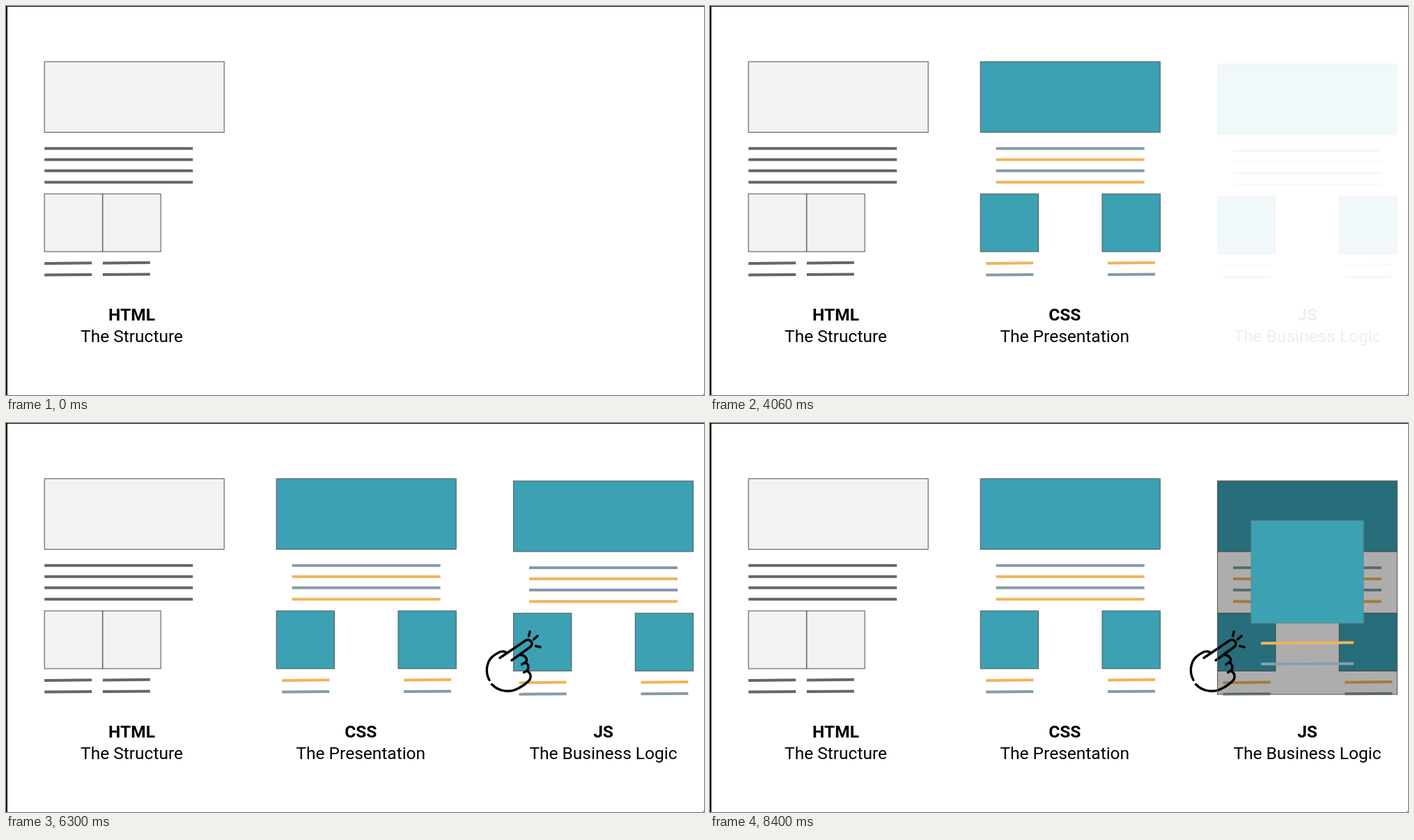
These frames come from a looping animation (1002x559 px, 8540 ms). An HTML page:

```html
<!DOCTYPE html>
<html lang="en">
<head>
<meta charset="utf-8">
<title>HTML, CSS and JS</title>
<style>
  html, body { margin: 0; width: 100%; height: 100%; overflow: hidden; background: #fff; }
  svg { display: block; width: 100%; height: 100%; }
  text { font: 24.5px Roboto, Arial, sans-serif; text-anchor: middle; }
  .title { font-weight: 700; }
  .box { stroke: #595e60; stroke-width: 1.1; }
  .bar { stroke-width: 4; fill: none; }
  #hand { fill: none; stroke: #000; stroke-width: 3.4; stroke-linecap: round; stroke-linejoin: round; }
</style>
</head>
<body>
<svg viewBox="0 0 1002 559">
  <g id="html"></g>
  <g id="css"></g>
  <g id="js"></g>
  <g id="hand">
    <path d="M694 369.5C687 357 690 340 702 333C708 329 712 326.500 718 329.500
             M709 337.500L746 312.500C752 309 758 316 753 321.500L726 341
             M739 333.500C745 333 750 340 746 343.500L740.500 347
             M746 344.500C751 347 751 354 747 356.500L743.500 358.500
             M748.500 356.500C754 360 754.500 367 750 371C746 375 740 379 735 381.500C723 388 707 386 697.500 375.500"/>
    <path d="M750.500 306L752 300M757.500 311L763 306M760.500 320.500L767 322"/>
  </g>
  <g id="dialog">
    <rect class="box" x="728.5" y="83.300" width="258" height="306.700" fill="#000" fill-opacity=".32"/>
    <rect class="box" x="777" y="140.500" width="161" height="147" fill="#3ba1b3" style="stroke:#5b8e99"/>
    <path class="bar" d="M791 316.500L924 315.500" stroke="#f0b45c"/>
    <path class="bar" d="M791 346.300L924 345.700" stroke="#869fae"/>
  </g>
  <path d="M0 0H1002V1H2V559H0Z"/>
  <rect x="1000.500" y="557.500" width="1.500" height="1.500" fill="#999"/>
</svg>
<script>
  const LOOP = 8540, TICK = 70;
  const byId = id => document.getElementById(id);

  const box = (x, y, w, h, fill) =>
    `<rect class="box" x="${x}" y="${y}" width="${w}" height="${h}" fill="${fill}"/>`;
  const bar = (x, y, length, color, rise = 0) =>
    `<path class="bar" d="M${x} ${y}l${length} ${-rise}" stroke="${color}"/>`;

  // A page wireframe: banner, paragraph, two cards and their captions.
  function page({ x, y, fill, colors, indent, cardGap, captionIndent }) {
    const [first, second] = colors;
    let out = box(x, y, 258, 101.5, fill);
    [125, 141, 157, 173.500].forEach((dy, i) => {
      out += bar(x + indent, y + dy - .2, 213, colors[i % 2]);
    });
    [0, 1].forEach(i => {
      const cardX = x + i * cardGap, captionX = cardX + captionIndent, lift = i * .5;
      out += box(cardX, y + 190, 83.300, 83, fill);
      out += bar(captionX, y + 290 - lift, 68, second, .8);
      out += bar(captionX, y + 306.500 - lift, 68, first, .6);
    });
    return out;
  }

  const label = (x, title, subtitle) =>
    `<text class="title" x="${x}" y="452">${title}</text><text x="${x}" y="483">${subtitle}</text>`;

  const plain = { fill: '#f2f2f2', colors: ['#666', '#666'], indent: 0, cardGap: 83.700, captionIndent: 0 };
  const styled = { fill: '#3ba1b3', colors: ['#869aa8', '#f0b45c'], indent: 22.500, cardGap: 174.800, captionIndent: 8 };

  byId('html').innerHTML = page({ x: 55.200, y: 80, ...plain }) + label(180.500, 'HTML', 'The Structure');
  byId('css').innerHTML = page({ x: 388.200, y: 80, ...styled }) + label(509.300, 'CSS', 'The Presentation');
  byId('js').innerHTML = page({ x: 728.500, y: 83.300, ...styled }) + label(857.500, 'JS', 'The Business Logic');

  const fades = [
    { el: byId('css'), start: 2648, duration: 210 },
    { el: byId('js'), start: 4040, duration: 310 },
    { el: byId('hand'), start: 5440, duration: 350 },
    { el: byId('dialog'), start: 6910, duration: 420 }
  ];

  const origin = performance.now();
  function draw() {
    const elapsed = (performance.now() - origin) % LOOP;
    const time = Math.floor(elapsed / TICK) * TICK;
    for (const { el, start, duration } of fades) {
      el.setAttribute('opacity', Math.min(1, Math.max(0, (time - start) / duration)));
    }
    requestAnimationFrame(draw);
  }
  draw();
</script>
</body>
</html>
```
